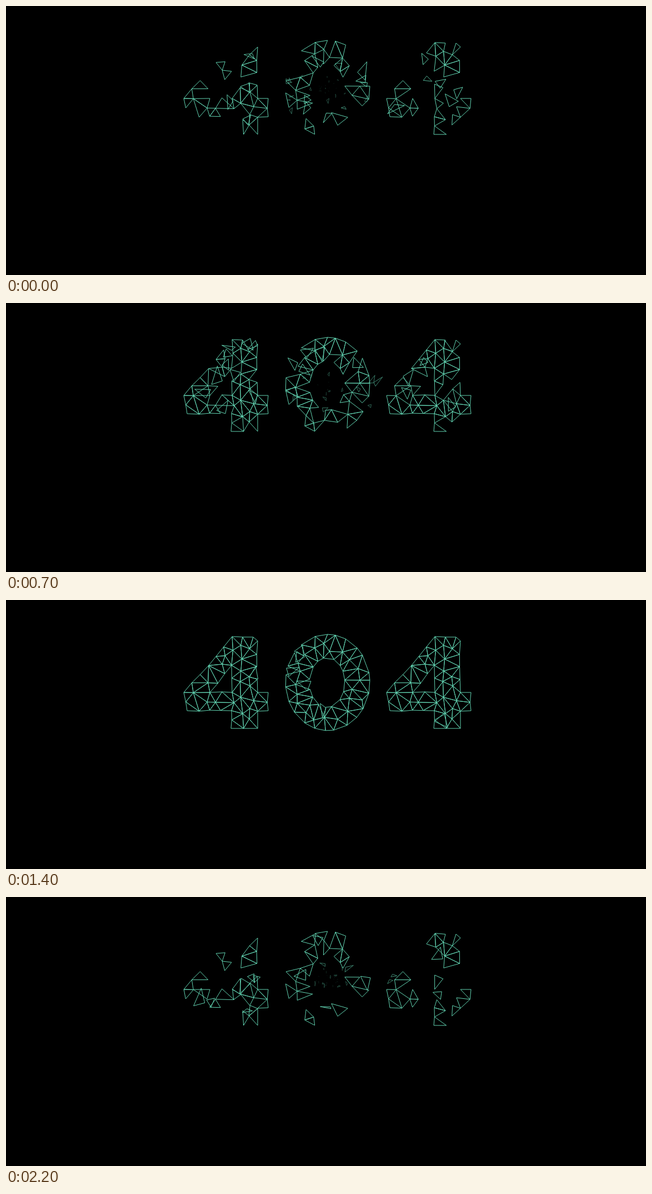
Animation of 1152x486 px, one loop 2.3 s. Source, as an HTML page with a canvas:

```html
<!DOCTYPE html>
<html lang="en">
<head>
<meta charset="utf-8">
<title>404</title>
<style>
  html, body { margin: 0; width: 100%; height: 100%; overflow: hidden; background: #000; }
  canvas { display: block; }
</style>
</head>
<body>
<canvas id="stage" width="1152" height="486"></canvas>
<script>
const LOOP = 2300, STEP = 100, RESTART = 1700;
const FLIGHT = 250, SETTLE = 160, LAST_ARRIVAL = 1960;
const CENTER = { x: 578, y: 148 };
const FAR = 0.055;            // scale of a piece at its starting depth
const COLOR = [98, 212, 178];
const EDGE = 21, GAP = 15;    // spacing of mesh points on the outline and inside

function randomFrom(seed) {
  return () => {
    seed = (seed * 1664525 + 1013904223) >>> 0;
    return seed / 4294967296;
  };
}
const random = randomFrom(404);
const jitter = amount => (random() * 2 - 1) * amount;

// Closed polygon with extra, slightly uneven points along its sides.
function subdivide(corners) {
  return corners.flatMap(([ax, ay], i) => {
    const [bx, by] = corners[(i + 1) % corners.length];
    const parts = Math.max(1, Math.round(Math.hypot(bx - ax, by - ay) / EDGE));
    return Array.from({ length: parts }, (_, k) => {
      const along = k / parts, wobble = k ? 1.8 : 0;
      return {
        x: ax + (bx - ax) * along + jitter(wobble),
        y: ay + (by - ay) * along + jitter(wobble)
      };
    });
  });
}

function ring(cx, cy, rx, ry, count) {
  return Array.from({ length: count }, (_, i) => {
    const angle = (i + jitter(0.25)) / count * 2 * Math.PI;
    return { x: cx + rx * Math.cos(angle), y: cy + ry * Math.sin(angle) };
  });
}

function inside(p, polygon) {
  let hit = false;
  polygon.forEach((a, i) => {
    const b = polygon[(i + 1) % polygon.length];
    if (a.y > p.y !== b.y > p.y && p.x < a.x + (b.x - a.x) * (p.y - a.y) / (b.y - a.y)) hit = !hit;
  });
  return hit;
}

const centroid = pts => ({
  x: (pts[0].x + pts[1].x + pts[2].x) / 3,
  y: (pts[0].y + pts[1].y + pts[2].y) / 3
});

function circumcircle(a, b, c) {
  const bx = b.x - a.x, by = b.y - a.y, cx = c.x - a.x, cy = c.y - a.y;
  const d = 2 * (bx * cy - by * cx);
  if (Math.abs(d) < 1) return null;
  const b2 = bx * bx + by * by, c2 = cx * cx + cy * cy;
  const x = (cy * b2 - by * c2) / d, y = (bx * c2 - cx * b2) / d;
  return { x: a.x + x, y: a.y + y, r2: x * x + y * y };
}

// Delaunay triangles of a glyph whose inside is filled with scattered points.
function mesh(outline, hole) {
  const covers = p => inside(p, outline) && !inside(p, hole);
  const points = [...outline, ...hole];
  const left = Math.min(...outline.map(p => p.x)), top = Math.min(...outline.map(p => p.y));
  for (let tries = 0; tries < 900; tries++) {
    const p = { x: left + 155 * random(), y: top + 175 * random() };
    if (covers(p) && points.every(q => Math.hypot(p.x - q.x, p.y - q.y) > GAP)) points.push(p);
  }

  const triangles = [];
  points.forEach((a, i) => {
    for (let j = i + 1; j < points.length; j++)
      for (let k = j + 1; k < points.length; k++) {
        const tri = [a, points[j], points[k]], circle = circumcircle(...tri);
        if (!circle || !covers(centroid(tri))) continue;
        const empty = points.every(p =>
          (p.x - circle.x) ** 2 + (p.y - circle.y) ** 2 > circle.r2 - 0.001);
        if (empty) triangles.push(tri);
      }
  });
  return triangles;
}

const four = mesh(
  subdivide([[407, 66], [445, 67], [453, 74], [453, 167], [472, 167], [472, 200], [453, 201],
    [453, 232], [405, 232], [406, 200], [326, 200], [320, 167], [378, 102]]),
  subdivide([[406, 118], [407, 167], [367, 167]])
);
const zero = mesh(ring(579, 149, 76, 87, 23), ring(578, 149, 32, 45, 15));
const shift = (tri, dx) => tri.map(p => ({ x: p.x + dx, y: p.y }));

const pieces = [...four, ...zero, ...four.map(tri => shift(tri, 365))].map(tri => ({
  tri,
  mid: centroid(tri),
  spin: Math.sign(random() - 0.5) * (0.6 + 1.2 * random()),
  arrival: 30 + (LAST_ARRIVAL - 30) * random() ** 1.5
}));
pieces.sort((a, b) => b.arrival - a.arrival);

const ctx = document.getElementById('stage').getContext('2d');
ctx.lineJoin = 'round';
const clamp = v => Math.max(0, Math.min(1, v));

function drawPiece({ tri, mid, spin, arrival }, time) {
  const flight = clamp(1 + (time - arrival) / FLIGHT);
  const settle = clamp((time - arrival) / SETTLE);
  const scale = FAR ** (1 - flight);
  const turn = Math.cos(Math.PI * (1 - flight));
  const angle = spin * (1 - settle) ** 2 * clamp(4 * flight);
  const cos = Math.cos(angle), sin = Math.sin(angle), tilt = Math.cos(angle * 0.8);
  // Waiting pieces fade into the dark soon after the start.
  const light = Math.max(flight && scale, 0.24 * clamp(1.2 - time / 400));
  if (light < 0.03) return;

  ctx.beginPath();
  for (const p of tri) {
    const dx = (p.x - mid.x) * tilt, dy = p.y - mid.y;
    const x = mid.x + dx * cos - dy * sin - CENTER.x;
    const y = mid.y + dx * sin + dy * cos - CENTER.y;
    ctx.lineTo(CENTER.x + x * scale * turn, CENTER.y + y * scale);
  }
  ctx.closePath();
  ctx.lineWidth = scale < 0.2 ? 0.6 : 1;
  ctx.strokeStyle = `rgb(${COLOR.map(c => Math.round(c * light))})`;
  ctx.stroke();
}

function draw(now) {
  const clock = Math.floor((now % LOOP) / STEP) * STEP;
  const time = (clock - RESTART + LOOP) % LOOP;
  ctx.fillStyle = '#000';
  ctx.fillRect(0, 0, 1152, 486);
  pieces.forEach(piece => drawPiece(piece, time));
}

const start = performance.now();
function tick() {
  draw(performance.now() - start);
  requestAnimationFrame(tick);
}
tick();
</script>
</body>
</html>
```
